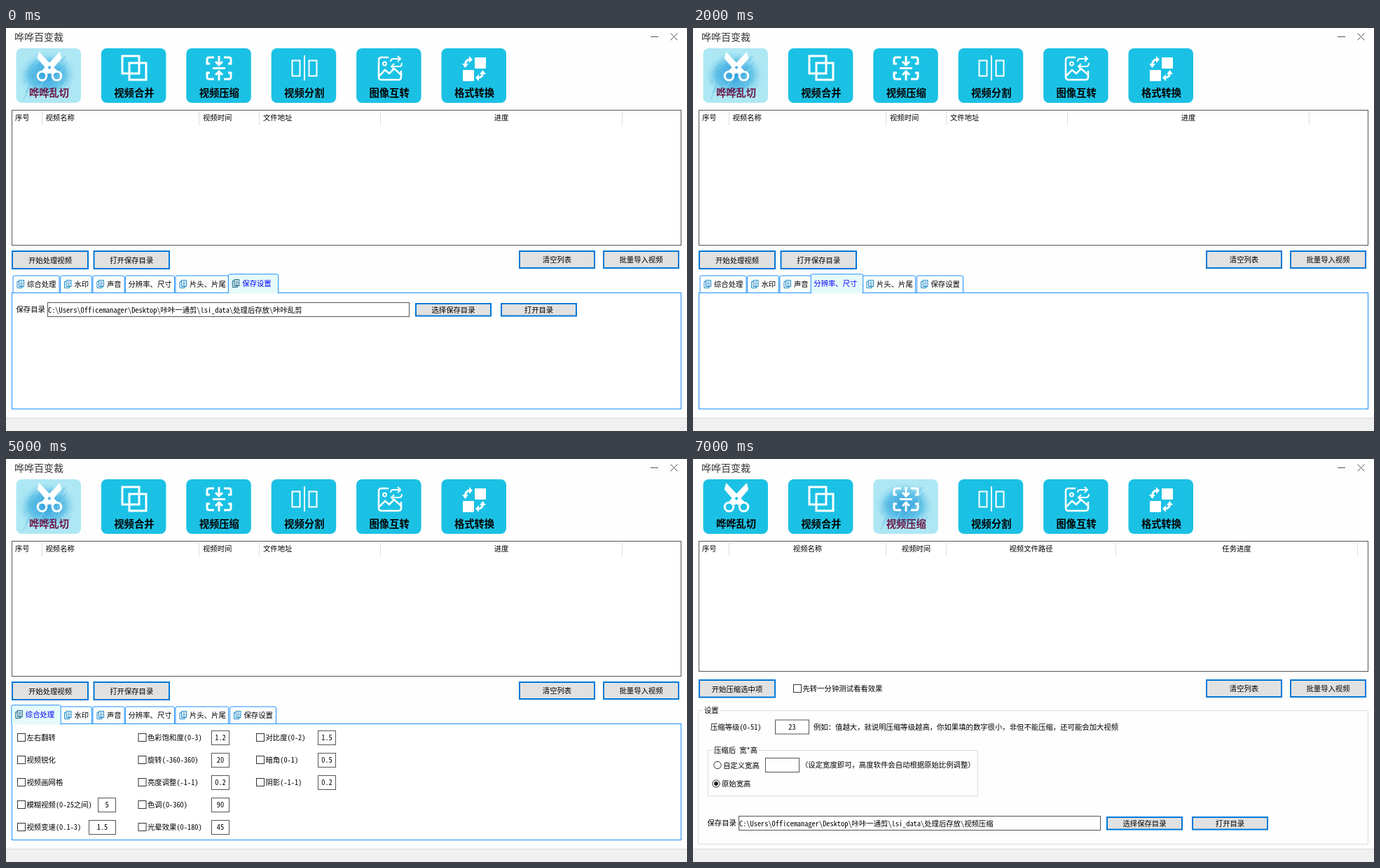
An HTML page for the animation above (8000 ms loop, 972 px wide and 576 px high).

```html
<!DOCTYPE html>
<html lang="zh-CN">
<head>
<meta charset="utf-8">
<style>
html, body { margin: 0; width: 100%; height: 100%; overflow: hidden; background: #fefefe; }
svg { display: block; text-spacing-trim: space-all; }
text { font: 10.36px "Noto Sans Mono CJK SC", "Noto Sans CJK SC", "Noto Sans CJK", monospace; }
.title { font: 14px "Noto Sans CJK SC", "Noto Sans CJK", sans-serif; fill: #333; }
.tool { font: bold 14.3px "Noto Sans CJK SC", "Noto Sans CJK", sans-serif; }
</style>
</head>
<body>
<svg id="stage" width="972" height="576" viewBox="0 0 972 576">
  <defs>
    <radialGradient id="brush">
      <stop offset="0" stop-color="#2f9fdc"/>
      <stop offset=".6" stop-color="#4fb9e4" stop-opacity=".75"/>
      <stop offset="1" stop-color="#b0e7f4" stop-opacity="0"/>
    </radialGradient>
  </defs>
  <text class="title" x="12" y="18">哗哗百变裁</text>
  <path d="M920 12.5h11M948.500 7.500l10 10m0-10l-10 10" fill="none" stroke="#555"/>
  <g id="tools"></g>
  <g id="view"></g>
  <path d="M0 557h972v19H0z" fill="#f0f0f0"/>
  <path d="M0 557.5h972" stroke="#d9d9d9"/>
</svg>
<script>
const BLUE = '#0078d7', GREY = '#e1e1e1', INK = '#555', LINE = '#1e90ff';

const rect = (x1, y1, x2, y2, fill, stroke, w = 1, r = 0) =>
  `<rect x="${x1 + w / 2}" y="${y1 + w / 2}" width="${x2 - x1 - w}" height="${y2 - y1 - w}" rx="${r}" fill="${fill}" stroke="${stroke}" stroke-width="${w}"/>`;
const path = (d, stroke, fill = 'none', w = 1) =>
  `<path d="${d}" fill="${fill}" stroke="${stroke}" stroke-width="${w}"/>`;
// Text is placed by its vertical middle.
const text = (x, y, s, fill = '#000', anchor = 'start') =>
  `<text x="${x}" y="${y + 3.8}" fill="${fill}" text-anchor="${anchor}">${s}</text>`;
const mid = (x, y, s) => text(x, y, s, '#000', 'middle');

const button = (x1, y1, x2, y2, s, stroke = BLUE, w = 2) =>
  rect(x1, y1, x2, y2, GREY, stroke, w) + mid((x1 + x2) / 2, (y1 + y2) / 2 + .5, s);
const plain = (x, y, s) => button(x, y, x + 75, y + 20, s, '#adadad', 1);
const field = (x1, y, x2, s = '') =>
  rect(x1, y, x2, y + 21, '#fff', INK) + mid((x1 + x2) / 2, y + 10.5, s);
const check = (x, y, s) => rect(x, y - 6, x + 12, y + 6, '#fff', '#333') + text(x + 13.5, y, s);
const radio = (x, y, s, on, ink = '#000') =>
  `<circle cx="${x}" cy="${y}" r="5.200" fill="#fff" stroke="${ink == '#000' ? '#333' : '#ccc'}"/>` +
  (on ? `<circle cx="${x}" cy="${y}" r="3" fill="#222"/>` : '') + text(x + 8, y + .5, s, ink);
const combo = (x, y, s) => rect(x, y, x + 110, y + 18, GREY, '#adadad') +
  text(x + 2.5, y + 9, s) + path(`M${x + 98} ${y + 7}l4 4 4-4`, '#444');
const group = (x1, y1, x2, y2, s, w) => rect(x1, y1, x2, y2, 'none', '#dcdcdc') +
  `<path d="M${x1 + 7} ${y1 - 2}h${w}v5h-${w}z" fill="#fefefe"/>` + text(x1 + 9, y1 + .5, s);
const saveRow = (x, y, folder) => text(x, y, '保存目录') +
  rect(x + 44.5, y - 10.5, x + 561.5, y + 10.5, '#fff', INK) +
  text(x + 45.5, y + .5, String.raw`C:\Users\Officemanager\Desktop\咔咔一通剪\lsi_data\处理后存放` + '\\' + folder) +
  button(x + 569.5, y - 9.5, x + 678.5, y + 10, '选择保存目录') +
  button(x + 691.5, y - 9.5, x + 800.5, y + 10, '打开目录');

const table = (bottom, seps, heads) => rect(8, 117, 964, bottom, '#fff', INK) +
  seps.map(x => path(`M${x + .5} 119v20`, '#dedede')).join('') +
  heads.map(([x, s, centred]) => (centred ? mid : text)(x, 128.5, s)).join('');
const listButtons = (x1, x2, y) => button(x1, y, x1 + 109, y + 26, '清空列表') +
  button(x2, y, x2 + 109, y + 26, '批量导入视频');

// Toolbar
const icons = [
  `<path d="M48 37L71 61 64 64 46.500 43zM76 37L53 61 60 64 77.500 43z" fill="#fff"/>
   <circle cx="51.500" cy="68.500" r="6.300"/><circle cx="72.500" cy="68.500" r="6.300"/>`,
  '<path d="M166 40h24v25h-24zM176 50h24v24h-24z"/>',
  '<path d="M297 42h-7q-3 0-3 3v6h4M311 42h7q3 0 3 3v6h-4M297 73h-7q-3 0-3-3v-6h4M311 73h7q3 0 3-3v-6h-4M295 57.500h18M304 40v12m-5-4l5 5 5-5M304 75v-12m-5 4l5-5 5 5"/>',
  '<path d="M408.500 46.500h11v22h-11zM432.500 46.500h11v22h-11zM426 39v36" stroke-width="2"/>',
  `<path d="M546 42h-10q-4 0-4 4v24q0 4 4 4h24q4 0 4-4v-9M532 69l9-9 6 5 7-7 10 9" stroke-width="2.500"/>
   <path d="M549 48q0-4 4-4h10m-4-4l4 4-4 4M565 50q0 5-4 5h-11m4-4l-4 4 4 4" stroke-width="2"/><circle cx="540.500" cy="51" r="2.500" stroke-width="2"/>`,
  `<path d="M670 42h14q1 0 1 1v14q0 1-1 1h-14q-1 0-1-1v-14q0-1 1-1zM653 60h14q1 0 1 1v14q0 1-1 1h-14q-1 0-1-1v-14q0-1 1-1zM661 40l5 5-5 5zM651 51h9l-4.500 6zM675 66l-5 5 5 5zM676 66h9l-4.500-6z" fill="#fff" stroke="none"/>
   <path d="M655.500 53q0-8 7-8M680.500 64q0 7-7 7"/>`
];
const labels = ['哗哗乱切', '视频合并', '视频压缩', '视频分割', '图像互转', '格式转换'];
const noise = n => { const v = Math.sin(n * 127.1) * 43758.5453; return v - Math.floor(v); };

function brush(x) {
  let out = `<ellipse cx="${x + 44}" cy="67" rx="44" ry="35" fill="url(#brush)"/>`;
  for (let i = 0; i < 55; i++) {
    const px = x + 8 + noise(i) * 70, py = 35 + noise(i + 70) * 56, len = 4 + noise(i + 140) * 9;
    out += path(`M${px} ${py + len}l${len * .6} ${-len}`, i % 3 ? '#2f9edb66' : '#c9f0f866');
  }
  return out;
}

const toolbar = active => labels.map((label, i) => {
  const x = 14.5 + i * 121.4, on = i == active;
  return `<rect x="${x}" y="29" width="92.500" height="78" rx="8" fill="${on ? '#aee7f4' : '#1bc1e4'}"/>` +
    (on ? brush(x) : '') +
    `<g fill="none" stroke="#fff" stroke-width="3">${icons[i]}</g>` +
    `<text class="tool" x="${x + 47}" y="98" text-anchor="middle" fill="${on ? '#6d1747' : '#000'}">${label}</text>`;
}).join('');

// Tab strip
const tabs = [[10, 76, '综合处理'], [77.5, 122.5, '水印'], [124, 169, '声音'],
  [170.5, 240.5, '分辨率、尺寸'], [242, 317.5, '片头、片尾'], [319.5, 385.5, '保存设置']];

function tab(i, on) {
  const [x, end, label] = tabs[i], grow = on ? 2.2 : 0;
  const left = x - grow, right = end + grow + (on && i == 5 ? 1 : 0), top = 354 - grow;
  const tx = x - grow, y = on ? 365 : 366, bare = i == 3;
  return path(`M${left} ${on ? 379.5 : 378}V${top + 2}q0-2 2-2H${right - 2}q2 0 2 2V${on ? 379.5 : 378}`, LINE, on ? '#e5fafb' : '#fff') +
    (bare ? '' : path(`M${tx + 8.5} ${y - 5.500}h7v9h-7zM${tx + 8.500} ${y - 3.500}h-2.500v9h7v-2M${tx + 10} ${y - 3}h4m-4 2.500h4m-4 2.500h4`, on ? '#175f80' : '#1585c5')) +
    text(tx + (bare ? 4 : 20), y, label, on ? '#00f' : '#000');
}

const trimming = table(311, [51, 275, 361, 534, 879],
    [[13, '序号'], [56.5, '视频名称'], [281, '视频时间'], [367, '文件地址'], [707, '进度', 1]]) +
  button(8, 318, 118, 345, '开始处理视频') + button(124.5, 318, 234, 345, '打开保存目录') + listButtons(732, 852, 318);
const tabPage = (active, content) => trimming + rect(8, 378, 964, 545, '#fff', LINE) +
  tabs.map((_, i) => i == active ? '' : tab(i)).join('') + tab(active, true) + content;

const clips = [[403, '头', 393], [435, '尾', 425]].map(([y, c, top]) =>
  check(21, y + .5, `加片${c}，文件夹内有多个片${c}的话，随机使用，片${c}目录：`) +
  field(311, top, 795) + plain(802, top - 1, '选择目录')).join('') +
  [['头', 468.5], ['尾', 502.5]].map(([c, y]) =>
    check(21, y, `原视频片${c}去除时间(秒)：`) + field(160, y - 10, 215, '10')).join('');

const sound = check(19.5, 405, '增加背景音乐(文件夹内有多个音乐的话，随机使用)') +
  field(275, 394, 614) + plain(622.5, 395, '选择目录') +
  check(725, 405, '新增音乐音量调整(0-1)') + field(864, 393, 898, '1') +
  check(19.5, 438, '调整原视频音量(0.1-3之间)') + field(167, 428, 201, '1.5') +
  check(249, 438, '删除原视频音频');

// Columns: checkbox x, field right edge, then rows of label, value, field width.
const effects = [
  [16, 157, ['左右翻转'], ['视频锐化'], ['视频画网格'], ['模糊视频(0-25之间)', 5, 26], ['视频变速(0.1-3)', 1.5, 39]],
  [188.5, 319, ['色彩饱和度(0-3)', 1.2, 26], ['旋转(-360-360)', 20, 26], ['亮度调整(-1-1)', .2, 26], ['色调(0-360)', 90, 26], ['光晕效果(0-180)', 45, 26]],
  [357, 471, ['对比度(0-2)', 1.5, 26], ['暗角(0-1)', .5, 26], ['阴影(-1-1)', .2, 26]]
].map(([x, right, ...rows]) => rows.map(([label, value, w], i) => {
  const y = 398 + Math.round(i * 32.1);
  return check(x, y, label) + (w ? field(right - w, y - 10, right, value) : '');
}).join('')).join('');

const listHeads = [[13, '序号'], [163.5, '视频名称', 1], [318.5, '视频时间', 1], [482.5, '视频文件路径', 1]];

const merging = table(304, [51, 275, 361, 603, 861, 948],
    [...listHeads, [733, '任务进度', 1], [867, '视频分辨率']]) +
  button(7.5, 313, 117, 339.5, '开始合并选中项') + listButtons(733, 854, 313) +
  group(8, 353, 965, 546, '设置', 24) +
  radio(31.5, 377.5, '模式一、顺序合并，合并个数', true) + field(180, 367, 229, '0') +
  text(235, 378, '（0或1表示列表内全部视频，合并成一个视频，其他的请自行填写具体数量）') +
  radio(31.5, 409, '模式二、左右合并，播放顺序') + combo(179.5, 399, '顺序轮播') +
  text(297, 405.5, '（每两个视频合并一次）') +
  radio(32.5, 441, '模式三、四宫格合并，播放顺序', false, '#808080') + combo(201.5, 431, '顺序轮播') +
  text(317.5, 441.5, '（每四个视频合并一次）') +
  saveRow(21.5, 515.5, '视频合并');

const compressing = table(304, [51, 275, 361, 603, 948], [...listHeads, [776, '任务进度', 1]]) +
  button(8, 315, 118, 341.5, '开始压缩选中项') + listButtons(732, 852, 315) +
  check(143, 328, '先转一分钟测试看看效果') +
  group(7, 359, 964, 551, '设置', 24) +
  text(25, 383, '压缩等级(0-51)') + field(117, 372.5, 166, '23') +
  text(172, 383, '例如：值越大，就说明压缩等级越高，你如果填的数字很小，非但不能压缩，还可能会加大视频') +
  group(21, 416, 407, 482, '压缩后 宽*高', 66) +
  radio(35, 437.5, '自定义宽高') + field(103, 427, 152) +
  text(154, 437.5, '（设定宽度即可，高度软件会自动根据原始比例调整）') +
  radio(33, 464, '原始宽高', true) +
  saveRow(20.5, 520.5, '视频压缩');

// One scene per second: active tool and page.
const scenes = [
  [0, tabPage(5, saveRow(14.5, 402.5, '咔咔乱剪'))],
  [0, tabPage(4, clips)],
  [0, tabPage(3, '')],
  [0, tabPage(2, sound)],
  [0, tabPage(1, '')],
  [0, tabPage(0, effects)],
  [1, merging],
  [2, compressing]
];

const tools = document.getElementById('tools'), view = document.getElementById('view');
let shown = -1;
function draw() {
  const now = Math.floor(performance.now() % 8000 / 1000);
  if (now != shown) {
    const [tool, page] = scenes[shown = now];
    tools.innerHTML = toolbar(tool);
    view.innerHTML = page;
  }
  requestAnimationFrame(draw);
}
draw();
</script>
</body>
</html>
```
